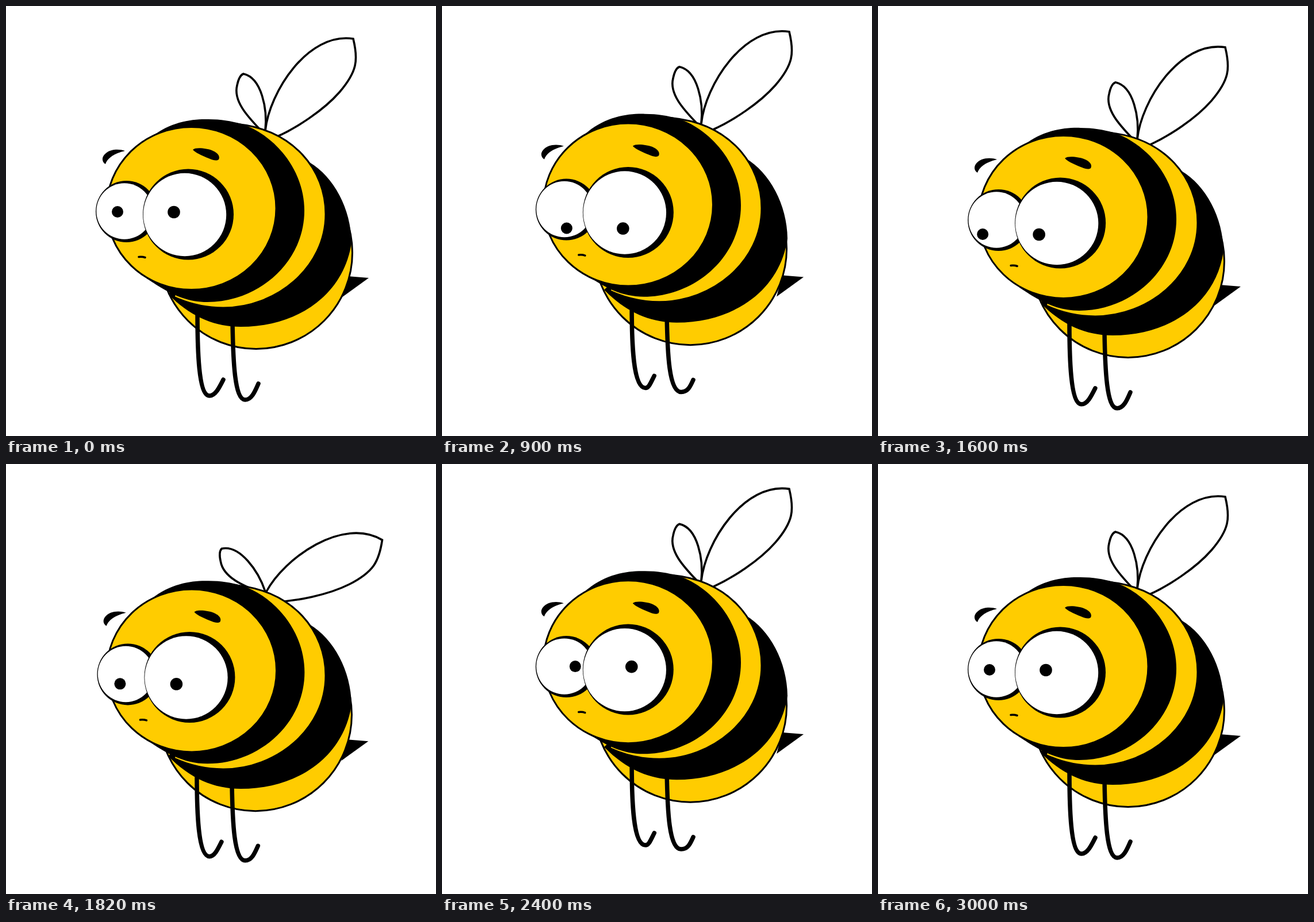
An HTML page for the animation above (3020 ms loop, 748 by 748 pixels).

```html
<!DOCTYPE html>
<html lang="en">
<head>
<meta charset="utf-8">
<title>Bee</title>
<style>
  html, body { margin: 0; width: 100%; height: 100%; overflow: hidden; background: #fff; }
  svg { display: block; width: 100vw; height: 100vh; }
  .line { stroke: #000; stroke-width: 3; }
  .wing { fill: #fff; stroke: #000; stroke-width: 3.6; }
  .lid { fill: #fc0; stroke: #000; stroke-width: 2.2; }
  .yellow { fill: #fc0; }
  .white { fill: #fff; }
  .leg { fill: none; stroke: #000; stroke-width: 7.5; stroke-linecap: round; }
  .mouth { fill: none; stroke: #000; stroke-width: 3.5; stroke-linecap: round; }
</style>
</head>
<body>
<svg viewBox="0 0 748 748">
  <defs>
    <clipPath id="leftClip"><circle cx="206" cy="357" r="48.7"/></clipPath>
    <clipPath id="rightClip"><circle cx="311" cy="363" r="72.2"/></clipPath>
  </defs>

  <!-- data-shift: how far a part drifts when the body is fully tilted -->
  <g data-shift="0 0">
    <path id="smallWing" class="wing" d="M443 216C420 192 395 165 402 138C404 128 408 120 413 118C445 125 455 180 451 217"/>
    <path id="bigWing" class="wing" d="M451 217C458 150 525 45 604 57C613 94 611 114 580 150C552 182 505 212 472 227"/>
  </g>
  <path data-shift="-2 11" d="M594 470L631 473L584 507Z"/>
  <circle data-shift="-3 5.5" class="yellow line" cx="435" cy="429" r="167.5"/>
  <path data-shift="0 5" d="M282 501C320 540 362 558 408 558C510 558 588 500 601 412C600 352 570 297 528 272Z"/>
  <path data-shift="0 2" class="yellow line" d="M400 205C500 215 556 285 556 362C556 455 470 525 378 525C345 525 318 518 292 506Z"/>
  <path data-shift="1 3" d="M240 240C275 203 320 196 352 197C375 197 390 200 410 205C468 225 519 285 519 356C519 445 440 515 350 515C310 515 280 498 245 474Z"/>
  <ellipse data-shift="1.5 6" class="yellow line" cx="322.5" cy="352" rx="147.5" ry="141.5"/>

  <path id="frontLeg" class="leg" data-shift="0 -1.3"/>
  <path id="backLeg" class="leg" data-shift="0 -1.3"/>

  <path data-shift="5 4" d="M207 252C195 248 178 249 170 260C166 266 168 272 173 275C176 266 186 257 207 252Z"/>
  <path data-shift="7 6" d="M325 250C330 245 350 248 358 251C368 255 373 261 370 267C366 270 360 268 355 266C345 262 330 256 325 250Z"/>

  <g data-shift="7 9">
    <path class="mouth" d="M231 436.5q6-.8 11 1"/>
    <circle cx="209.5" cy="357.5" r="53.5"/>
    <circle class="white" cx="206" cy="357" r="48.7"/>
    <g clip-path="url(#leftClip)">
      <circle class="pupil" cx="194" cy="358" r="10"/>
      <g class="lids" data-eye="206 357.5 50"></g>
    </g>
    <circle cx="317" cy="362.5" r="79"/>
    <circle class="white" cx="311" cy="363" r="72.2"/>
    <g clip-path="url(#rightClip)">
      <circle class="pupil" cx="292" cy="358.5" r="10.8"/>
      <g class="lids" data-eye="311 359.5 76"></g>
    </g>
  </g>
</svg>
<script>
const LOOP = 3020, STEP = 20, FLAP = 100;

// Keys are [time, value, ...]; values ease in and out between them.
const BOB = [[0, 0], [720, -15.5], [1570, 15], [2225, -15.5], [3000, 0]];
const TILT = [[0, 0], [760, 1.06], [1540, 0], [2260, 1.06], [3000, 0]];
const GAZE = [
  [240, 0, 0], [840, 16, 32], [900, 16, 32], [1500, -12, 24],
  [1600, -12, 24], [2170, 31, -1], [2400, 31, -1], [3000, 0, 0]
];
const BLINK = { middle: 449, half: 150 };

const all = selector => [...document.querySelectorAll(selector)];
const byId = id => document.getElementById(id);
const numbers = text => text.split(" ").map(Number);
const ease = x => (1 - Math.cos(Math.PI * x)) / 2;

function sample(keys, t) {
  const next = keys.findIndex(key => key[0] > t);
  if (next === 0) return keys[0].slice(1);
  if (next < 0) return keys[keys.length - 1].slice(1);
  const a = keys[next - 1], b = keys[next];
  const k = ease((t - a[0]) / (b[0] - a[0]));
  return a.slice(1).map((v, i) => v + (b[i + 1] - v) * k);
}

const parts = all("[data-shift]").map(node => ({ node, shift: numbers(node.dataset.shift) }));
const pupils = all(".pupil");
const lids = all(".lids").map(node => ({ node, eye: numbers(node.dataset.eye) }));

function drawLegs(tilt) {
  const x = -3 * tilt, tip = -9 * tilt, lift = 7 * tilt;
  byId("frontLeg").setAttribute("d",
    `M${333 + x} 535C${333 + x} 600 ${335 + x} 678 354 678C${364 + tip / 2} 678 ${371 + tip} ${664 + lift} ${378 + tip} ${650 + lift}`);
  byId("backLeg").setAttribute("d",
    `M${394 + x} 550C${395 + x} 620 ${398 + x} 685 416 685C428 685 ${434 - 2 * tilt} ${668 + lift} ${439 - 2 * tilt} ${657 + lift}`);
}

function drawLids(t) {
  const open = Math.abs(t - BLINK.middle) / BLINK.half;
  for (const { node, eye: [x, y, r] } of lids) {
    const gap = r * open, left = x - r - 5, width = 2 * r + 10;
    const lid = top => `<rect class="lid" x="${left}" y="${top}" width="${width}" height="${2 * r}"/>`;
    node.innerHTML = open >= 1 ? ""
      : `<g transform="rotate(.6 ${x} ${y})">${lid(y - gap - 2 * r)}${lid(y + gap)}</g>`;
  }
}

function draw(t) {
  const [bob] = sample(BOB, t), [tilt] = sample(TILT, t), [gx, gy] = sample(GAZE, t);
  for (const { node, shift: [x, y] } of parts)
    node.setAttribute("transform", `translate(${x * tilt} ${bob + y * tilt})`);

  const flap = ease(2 * (t % FLAP) / FLAP);
  byId("bigWing").setAttribute("transform", `rotate(${64 * flap} 450.5 221)`);
  byId("smallWing").setAttribute("transform", `rotate(${-71 * flap} 449 217)`);

  for (const pupil of pupils) pupil.setAttribute("transform", `translate(${gx} ${gy})`);
  drawLegs(tilt);
  drawLids(t);
}

const start = performance.now();
function tick(now) {
  const t = Math.max(0, now - start) % LOOP;
  draw(Math.floor(t / STEP) * STEP);
  requestAnimationFrame(tick);
}
draw(0);
requestAnimationFrame(tick);
</script>
</body>
</html>
```
